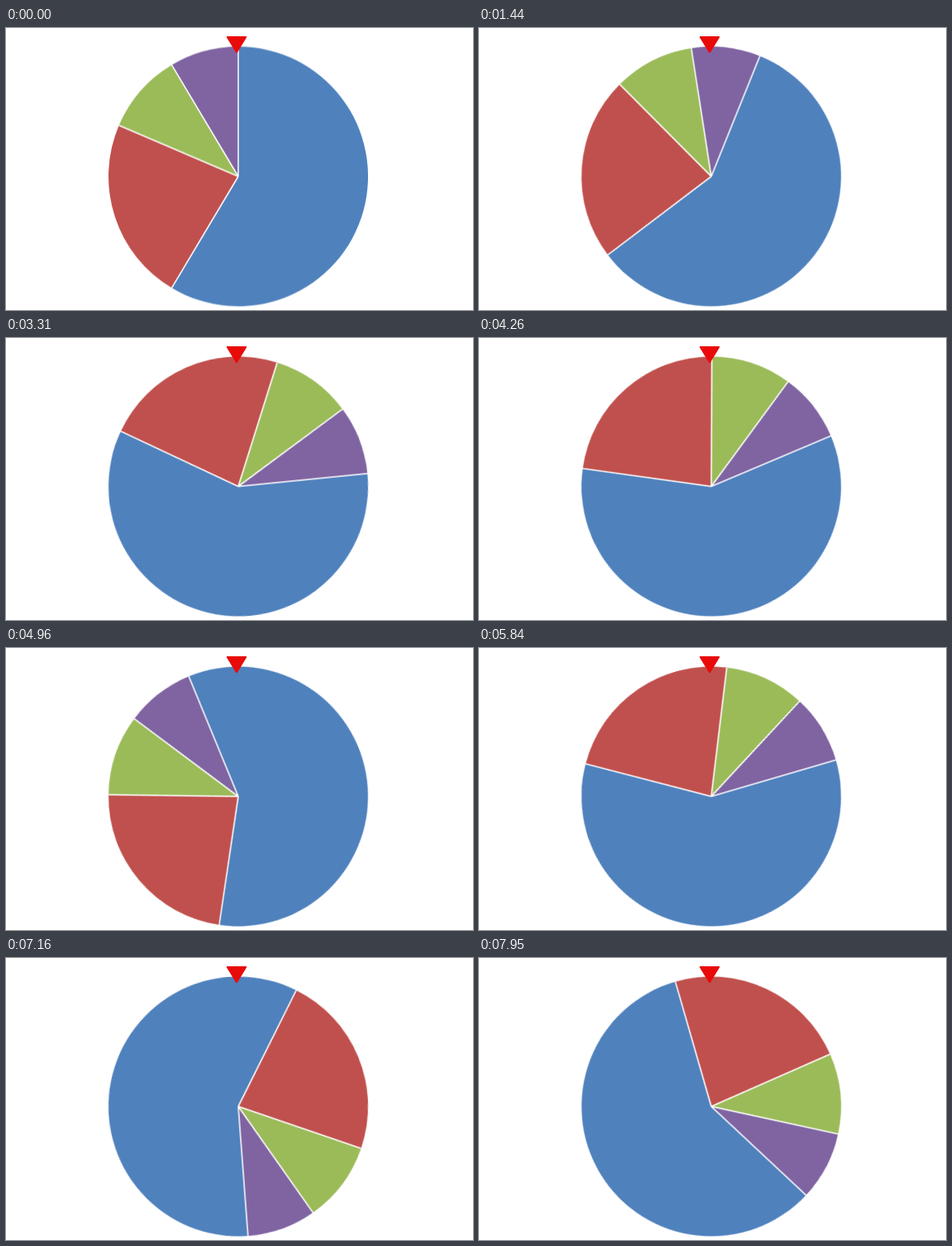
Recreate the animation shown at these times as an HTML page. Size 565 by 341 pixels, loop 8000 ms.

```html
<!DOCTYPE html>
<html lang="en">
<head>
<meta charset="utf-8">
<title>Spinning pie</title>
<style>
  html, body { margin: 0; width: 100%; height: 100%; overflow: hidden; background: #fff; }
  svg { display: block; width: 565px; height: 341px; }
  #pie { transform-origin: 0 0; }
</style>
</head>
<body>
<svg viewBox="0 0 565 341">
  <g transform="translate(281 179.5)"><g id="pie"></g></g>
  <path d="M267 10H291V11.5L279.7 30H278.3L267 11.5Z" fill="#e90a0a"/>
</svg>
<script>
const LOOP = 8000;
const RADIUS = 157;
const SLICES = [[8.2, '#4f81bd'], [3.2, '#c0504d'], [1.4, '#9bbb59'], [1.2, '#8064a2']];

// Key poses: time in ms, angle in degrees, equal steps to the next pose (1 = hold).
const POSES = [
  [0, 0, 1],
  [1440, 22, 15],
  [2620, 435, 1],
  [3310, 444.3, 12],
  [4260, 787.1, 9],
  [4960, 1057.6, 3],
  [5200, 1137, 1],
  [5840, 1153.7, 7],
  [6380, 1356, 20],
  [7950, 1933.1, 1],
  [LOOP, 1933.1, 1]
];

const pie = document.getElementById('pie');

function addPath(attributes) {
  const path = document.createElementNS('http://www.w3.org/2000/svg', 'path');
  for (const name in attributes) path.setAttribute(name, attributes[name]);
  pie.append(path);
}

function rim(turn) {
  const a = turn * 2 * Math.PI;
  return `${RADIUS * Math.sin(a)} ${-RADIUS * Math.cos(a)}`;
}

function drawPie() {
  const total = SLICES.reduce((sum, [value]) => sum + value, 0);
  let start = 0, dividers = '';
  for (const [value, fill] of SLICES) {
    const share = value / total, end = start + share;
    const large = share > 0.5 ? 1 : 0;
    addPath({ d: `M0 0L${rim(start)}A${RADIUS} ${RADIUS} 0 ${large} 1 ${rim(end)}Z`, fill });
    dividers += `M0 0L${rim(start)}`;
    start = end;
  }
  addPath({ d: dividers, stroke: '#fff', 'stroke-width': 1.5 });
}

drawPie();
pie.animate(
  POSES.map(([time, angle, steps]) => ({
    offset: time / LOOP,
    transform: `rotate(${angle}deg)`,
    easing: `steps(${steps})`
  })),
  { duration: LOOP, iterations: Infinity }
);
</script>
</body>
</html>
```
